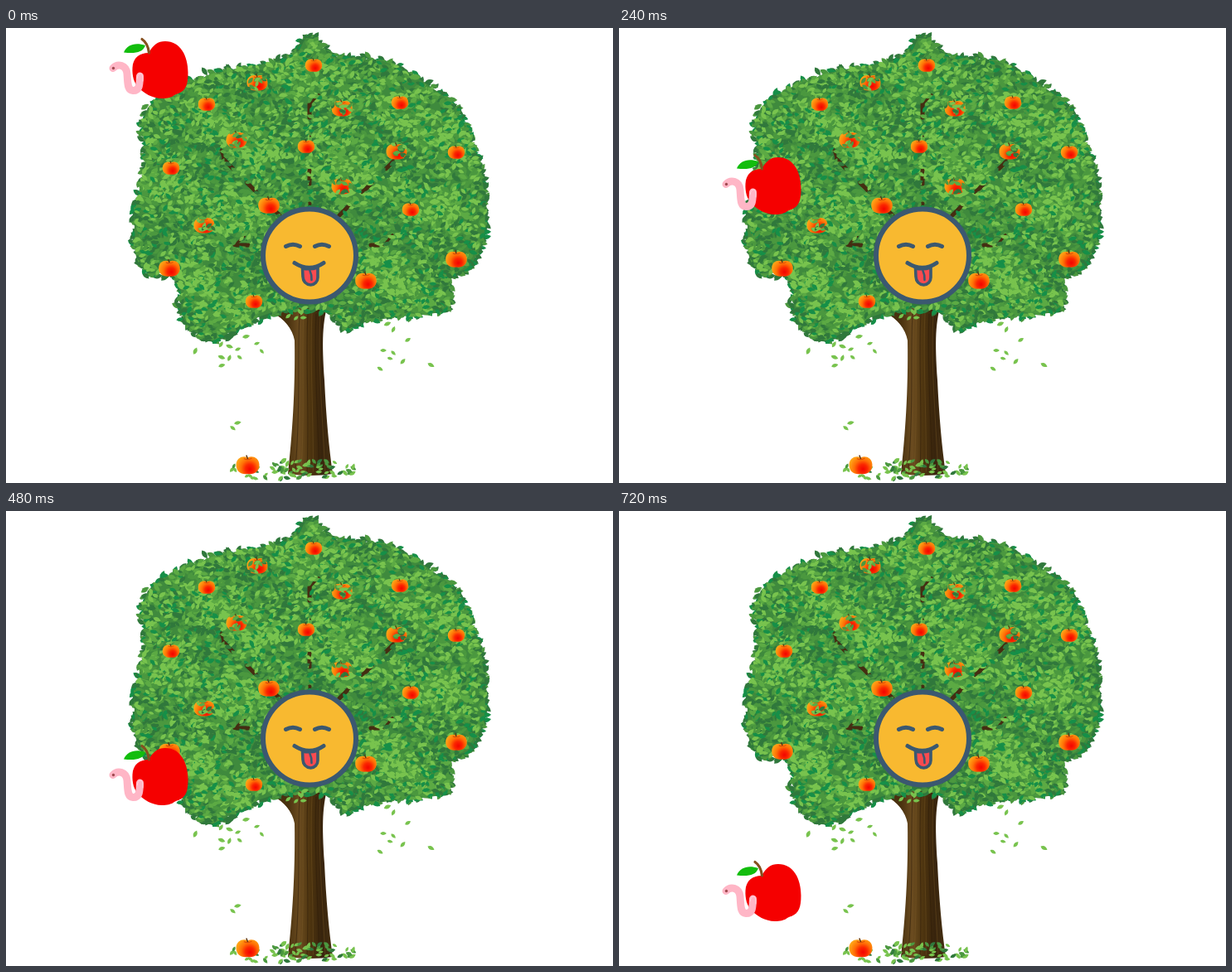
Animation, 732 px wide and 549 px high, one loop 0.84 s. Source, as an HTML page with a canvas:

```html
<!DOCTYPE html>
<html lang="en">
<head>
<meta charset="utf-8">
<title>Apple tree</title>
<style>
html, body { margin: 0; width: 100%; height: 100%; overflow: hidden; background: #fff; }
canvas { display: block; }
</style>
</head>
<body>
<canvas id="stage" width="732" height="549"></canvas>
<script>
const W = 732, H = 549, STEP_MS = 120;
const DROPS = [0, 70, 140, 200, 270, 340, 410];
const LIME = '#78c34e', MID = '#4b983f', DARK = '#30783c', TEAL = '#168f48', FRESH = '#5caa44';

const screen = document.getElementById('stage').getContext('2d');
const scenery = document.createElement('canvas');
scenery.width = W;
scenery.height = H;
const tree = scenery.getContext('2d');

let seed = 20417;
function random() {
  seed = (seed * 1664525 + 1013904223) >>> 0;
  return seed / 4294967296;
}
const between = (a, b) => a + (b - a) * random();
const pick = list => list[Math.floor(random() * list.length)];

function fill(c, d, color) {
  c.fillStyle = color;
  c.fill(new Path2D(d));
}

function line(c, d, color, width) {
  c.strokeStyle = color;
  c.lineWidth = width;
  c.lineCap = c.lineJoin = 'round';
  c.stroke(new Path2D(d));
}

function leaf(x, y, length, color, angle = between(-1.3, 1)) {
  const half = length / 2;
  tree.save();
  tree.translate(x, y);
  tree.rotate(angle);
  tree.beginPath();
  tree.moveTo(-half, 0);
  tree.quadraticCurveTo(-half * 0.1, -half, half, 0);
  tree.quadraticCurveTo(-half * 0.1, half, -half, 0);
  tree.fillStyle = color;
  tree.fill();
  tree.restore();
}

function scatter(count, left, top, right, bottom, colors) {
  for (let i = 0; i < count; i++) {
    leaf(between(left, right), between(top, bottom), between(7, 9.5), pick(colors));
  }
}

// Samples a closed Catmull-Rom curve through the key points.
function smoothLoop(keys, samples) {
  const at = i => keys[(i + keys.length) % keys.length];
  const spline = (a, b, c, d, t) =>
    b + t / 2 * (c - a + t * (2 * a - 5 * b + 4 * c - d + t * (3 * (b - c) + d - a)));
  return keys.flatMap((_, i) => Array.from({ length: samples }, (_, k) =>
    [0, 1].map(axis => spline(at(i - 1)[axis], at(i)[axis], at(i + 1)[axis], at(i + 2)[axis], k / samples))));
}

const outline = smoothLoop([
  [365, 12], [398, 36], [458, 41], [522, 78], [550, 110], [573, 175], [577, 245], [559, 287],
  [535, 300], [526, 341], [440, 350], [412, 360], [386, 340], [335, 340], [292, 354], [250, 375],
  [215, 352], [206, 300], [166, 290], [155, 235], [168, 165], [171, 98], [245, 57], [340, 37]
], 8);
const crown = new Path2D('M' + outline.join('L') + 'Z');

// Light and dark clumps come from a slow wave over the crown.
const clump = (x, y) => Math.sin(x / 19 + 2 * Math.sin(y / 37)) + Math.sin(y / 16 - x / 43);

function foliage(count, shortest, longest, colors) {
  while (count > 0) {
    const x = between(145, 588), y = between(8, 382);
    if (!tree.isPointInPath(crown, x, y)) continue;
    const shade = clump(x, y);
    let color = pick(colors);
    if (shade < -0.7 && color === LIME && random() < 0.6) color = DARK;
    if (shade > 0.8 && color === DARK) color = LIME;
    leaf(x, y, between(shortest, longest), color);
    count--;
  }
}

function raggedEdge() {
  for (const [x, y] of outline) {
    const reach = between(2, 6);
    for (let i = 0; i < 4; i++) {
      leaf(x + between(-reach, reach), y + between(-reach, reach), between(8, 13), pick([DARK, DARK, MID, TEAL]));
    }
  }
}

function limbs() {
  tree.save();
  tree.setLineDash([16, 24]);
  for (let i = 0; i < 5; i++) {
    const angle = -i * Math.PI / 4;
    const length = 90 - 80 * Math.sin(angle);
    const x = 366 + length * Math.cos(angle), y = 262 + length * Math.sin(angle);
    line(tree, `M${x} ${y}L366 262`, '#452d12', 5);
    line(tree, `M${x} ${y}l${between(-24, 24)} -22`, '#452d12', 3);
  }
  tree.restore();
}

function fruit(x, y, r) {
  tree.save();
  tree.translate(x, y);
  tree.scale(r, r);
  const glow = tree.createRadialGradient(0.2, 0.35, 0.05, 0.15, 0.25, 1.15);
  glow.addColorStop(0, '#f40800');
  glow.addColorStop(0.3, '#fb2600');
  glow.addColorStop(0.62, '#ff7006');
  glow.addColorStop(1, '#ffa416');
  fill(tree, 'M0-.65C.4-.85 1-.65 1 0C1 .5 .6 .84 0 .75C-.6 .84-1 .5-1 0C-1-.65-.4-.85 0-.65Z', glow);
  line(tree, 'M0-.55L-.1-.82', '#5a3212', 0.1);
  line(tree, 'M-.3-.55Q0-.4 .32-.58', '#d84a08', 0.08);
  tree.restore();
}

function hiddenFruit(x, y, r) {
  fruit(x, y, r);
  scatter(13, x - r, y - r * 0.8, x + r, y + r * 0.6, [MID, LIME, DARK, FRESH]);
}

function trunk() {
  const bark = tree.createLinearGradient(340, 0, 394, 0);
  bark.addColorStop(0, '#49310f');
  bark.addColorStop(0.25, '#6b4c20');
  bark.addColorStop(0.5, '#4d340f');
  bark.addColorStop(0.75, '#38240d');
  bark.addColorStop(1, '#463012');
  fill(tree, 'M321 336Q336 338 340 326L390 326C381 355 381 378 384 425Q387 490 394 538Q367 542 340 538C345 493 349 437 348 377Q344 356 321 343Z', bark);
  for (let x = 354; x < 382; x += 5) {
    line(tree, `M${x} 345C${x - 3} 400 ${x + 2} 460 ${x + (x - 366) * 0.45} 535`, x % 2 ? '#80602c55' : '#2e1d0b88', 1.1);
  }
}

function face() {
  const ink = '#3b5870';
  tree.beginPath();
  tree.arc(366, 274.5, 56, 0, Math.PI * 2);
  tree.fillStyle = '#f8b930';
  tree.fill();
  tree.strokeStyle = ink;
  tree.lineWidth = 6;
  tree.stroke();
  for (const x of [337.5, 372.5]) line(tree, `M${x} 263.500q8.500-4.500 17 0`, ink, 5);
  line(tree, 'M348 283.500Q366 295 383 283.500', ink, 5);
  const tongue = 'M357.500 290Q367 292 376 289V301A9 9 0 0 1 367.500 310Q358.500 309 358 300Z';
  fill(tree, tongue, '#fa4b4f');
  line(tree, tongue, ink, 3.6);
  line(tree, 'M366.500 293Q369 298 368.500 304', ink, 2.6);
}

function paintTree() {
  trunk();
  raggedEdge();
  tree.fillStyle = '#3f8a3d';
  tree.fill(crown);
  foliage(2400, 9, 14, [DARK, MID, MID, FRESH]);
  foliage(1800, 7, 10.5, [LIME, LIME, MID, FRESH, DARK, TEAL]);
  limbs();
  foliage(2600, 7, 10.5, [LIME, LIME, LIME, MID, FRESH, DARK, TEAL]);

  const hidden = [[303, 66], [278, 135], [405, 97], [471, 149], [405, 191], [239, 238]];
  const small = [[371, 45], [242, 92], [475, 90], [543, 150], [199, 169], [362, 143], [488, 219], [299, 330]];
  const large = [[317, 214], [197, 290], [543, 279], [434, 305]];
  hidden.forEach(([x, y]) => hiddenFruit(x, y, 12.5));
  small.forEach(([x, y]) => fruit(x, y, 10.2));
  large.forEach(([x, y]) => fruit(x, y, 12.8));

  for (let i = 0; i < 85; i++) {
    const along = between(-1, 1);
    const y = 533 + between(-13, 13) * Math.sqrt(1 - along * along);
    leaf(346 + 76 * along, y, between(6, 9), pick([LIME, LIME, MID, DARK]));
  }
  fruit(291.5, 527.5, 14);

  scatter(11, 226, 366, 310, 408, [LIME]);
  scatter(9, 448, 354, 515, 414, [LIME]);
  scatter(2, 273, 475, 281, 486, [LIME]);
  scatter(5, 338, 340, 368, 352, [LIME]);
  face();
}

function wormyApple(c) {
  fill(c, 'M172 30C178 20 183 16 192 16C210 16 219.500 33 219.500 54C219.500 68 217 75 208 79C202 80 202 85 188 85C176 85 166 78 161 73C154 67 152 57 152.500 48C153 36 161 30 172 30Z', '#f50000');
  fill(c, 'M142 29.500C146 20 156 17 168 21C165 30 155 31 142 29.500Z', '#12bd0d');
  line(c, 'M164 13.500Q171 18 172.500 30', '#86501f', 3.2);
  line(c, 'M129 48.500C135 42 145 45 146 55C147 66 146 75 153 75.500C162 76 161 66 161.500 58', '#ffb6c6', 9);
  line(c, 'M158 61Q159 55 162.500 55Q166 57 165 64', '#ffd5dd', 1);
  c.beginPath();
  c.arc(129.5, 48.5, 1.7, 0, Math.PI * 2);
  c.fillStyle = '#a04a50';
  c.fill();
}

function draw(now) {
  const step = Math.floor(Math.max(0, now) / STEP_MS) % DROPS.length;
  screen.fillStyle = '#fff';
  screen.fillRect(0, 0, W, H);
  screen.drawImage(scenery, 0, 0);
  screen.save();
  screen.translate(0, DROPS[step]);
  wormyApple(screen);
  screen.restore();
  requestAnimationFrame(draw);
}

paintTree();
draw(performance.now());
</script>
</body>
</html>
```
